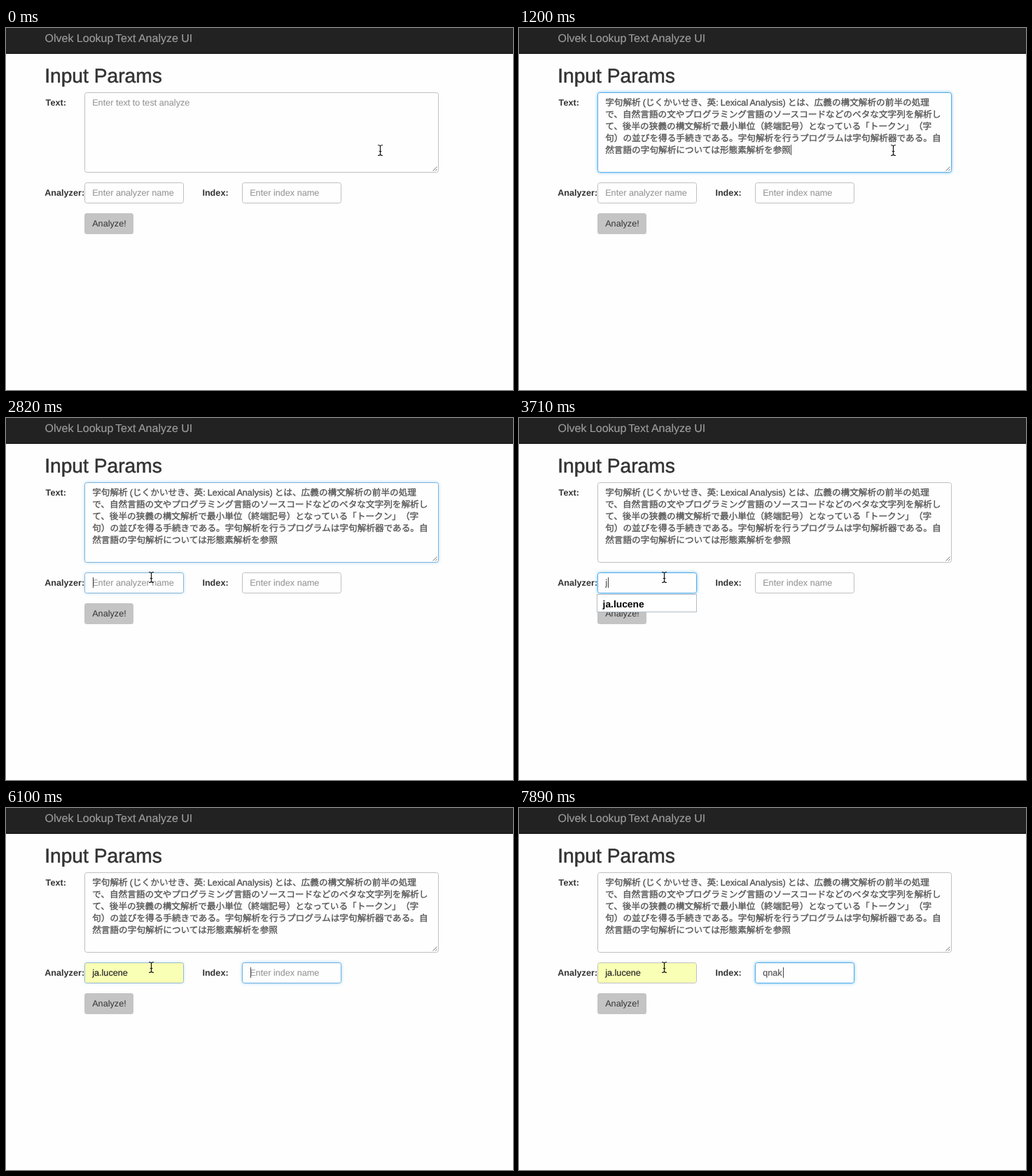
These frames come from a looping animation (724 px wide and 518 px high, 8 s). An HTML page:

```html
<!DOCTYPE html>
<html lang="ja">
<head>
<meta charset="utf-8">
<title>Text analyze form</title>
<style>
  html, body { margin: 0; width: 100%; height: 100%; overflow: hidden; background: #fefefe; }
  svg { display: block; width: 724px; height: 518px; }
  text {
    font-family: "Liberation Sans", "Noto Sans CJK JP", "Noto Sans CJK", sans-serif;
    font-size: 12.65px; fill: #333; white-space: pre;
    text-rendering: geometricPrecision; text-spacing-trim: space-all;
  }
  .brand { font-size: 16px; fill: #9d9d9d; stroke: #9d9d9d; stroke-width: .15px; }
  .title { font-size: 28.2px; stroke: #333; stroke-width: .55px; }
  .label { font-size: 12.65px; font-weight: bold; }
  .hint { fill: #999; stroke: #999; stroke-width: .15px; }
  .value { fill: #555; stroke: #555; stroke-width: .2px; }
  .para { word-spacing: -.5px; stroke-width: .35px; }
  .option { font-size: 13.8px; font-weight: bold; fill: #000; }
</style>
</head>
<body>
<svg id="stage" viewBox="0 0 724 518" xmlns="http://www.w3.org/2000/svg"></svg>
<script>
const LOOP = 8000;
const PAPER = '#fefefe', YELLOW = '#f9ffb5';
const GRAY = [192, 192, 192], BLUE = [82, 172, 234];
const stage = document.getElementById('stage');

function add(tag, attrs, parent = stage) {
  const node = document.createElementNS('http://www.w3.org/2000/svg', tag);
  for (const key in attrs) node.setAttribute(key, attrs[key]);
  parent.appendChild(node);
  return node;
}

function write(x, y, kind, words = '') {
  const node = add('text', { x, y, class: kind });
  node.textContent = words;
  return node;
}

function field(x, y, w, h) {
  return add('rect', { x: x + .5, y: y + .5, width: w - 1, height: h - 1, rx: 3, fill: PAPER });
}

function show(node, on) {
  node.style.display = on ? '' : 'none';
}

// Blend a field's border and glow: 0 = idle, 1 = focused.
function focus(node, k) {
  const rgb = GRAY.map((c, i) => Math.round(c + (BLUE[i] - c) * k));
  node.setAttribute('stroke', `rgb(${rgb})`);
  node.style.filter = k ? `drop-shadow(0 0 2px rgba(102,185,240,${.9 * k}))` : 'none';
}

// Value of the last step that has begun.
function at(t, steps) {
  let value = steps[0][1];
  for (const [time, next] of steps) if (t >= time) value = next;
  return value;
}

// Page
add('rect', { width: 724, height: 518, fill: PAPER });
add('rect', { width: 724, height: 37, fill: '#222' });
add('rect', { y: 36, width: 724, height: 1, fill: '#0c0c0c' });
write(55.5, 20, 'brand', 'Olvek Lookup');
write(156, 20, 'brand', 'Text Analyze UI');
write(55.2, 78, 'title', 'Input Params');
write(56.6, 111, 'label', 'Text:');
write(55.2, 240, 'label', 'Analyzer:');
write(280.4, 240, 'label', 'Index:');

// Fields
const area = field(112, 92, 506, 115);
const analyzer = field(112, 221, 142, 30);
const index = field(337, 221, 142, 30);
add('path', { d: 'M609.5 204.5l6-6m-2.5 6l2.5-2.5', stroke: '#777', fill: 'none' });

add('rect', { x: 112, y: 265, width: 70, height: 30, rx: 3.5, fill: '#c4c4c4' });
write(123.2, 284, '', 'Analyze!');

const areaHint = write(123.2, 111, 'hint', 'Enter text to test analyze');
const areaLines = [
  '字句解析 (じくかいせき、英: Lexical Analysis) とは、広義の構文解析の前半の処理',
  'で、自然言語の文やプログラミング言語のソースコードなどのベタな文字列を解析し',
  'て、後半の狭義の構文解析で最小単位（終端記号）となっている「トークン」（字',
  '句）の並びを得る手続きである。字句解析を行うプログラムは字句解析器である。自',
  '然言語の字句解析については形態素解析を参照'
].map((line, i) => write(123.2, 111 + 17 * i, 'value para', line));

const picked = add('rect', { x: 137, y: 228, width: 37, height: 15, fill: '#abd3f0' });
const analyzerHint = write(123.2, 240, 'hint', 'Enter analyzer name');
const analyzerText = write(123.2, 240, 'value');
const indexHint = write(348.2, 240, 'hint', 'Enter index name');
const indexText = write(348.2, 240, 'value');

// Suggestion list
const list = add('rect', { x: 111.5, y: 252.5, width: 142, height: 25 });
const option = write(119.6, 271, 'option', 'ja.lucene');

const caret = add('rect', { width: 1, height: 15, fill: '#444' });

// Pointers
const beam = add('g', { fill: 'none', stroke: '#111', 'stroke-width': 1.2 });
add('path', {
  d: 'M-3.5-7.5Q-.6-7.5 0-6Q.6-7.5 3.5-7.5M0-6V6M-3.5 7.5Q-.6 7.5 0 6Q.6 7.5 3.5 7.5M-1.8 1.5H1.8'
}, beam);
const arrow = add('g', {});
add('path', {
  d: 'M0 0V12.5L2.9 9.8 5.1 15 7.3 14 5.1 9H9Z',
  fill: '#000', stroke: '#fff', 'stroke-width': 1.6, 'paint-order': 'stroke'
}, arrow);

const areaFocus = [[0, 0], [150, 1], [2680, .6], [2830, .15], [2970, 0]];
const analyzerFocus = [[0, 0], [2680, .5], [2830, .9], [2970, 1], [6100, .35], [6250, 0]];
const indexFocus = [[0, 0], [6100, .75], [6250, 1]];
const analyzerTyped = [[0, ''], [3710, 'j'], [3860, 'ja'], [4160, 'ja.'], [5210, 'ja.lucene']];
const indexTyped = [[0, ''], [6840, 'q'], [6990, 'qn'], [7440, 'qna'], [7890, 'qnak']];
const caretSpot = [
  [0, null], [150, [124, 99]], [600, null], [1200, [388, 167]], [1640, null],
  [2680, [124, 228]], [3420, null], [3710, [127, 228]], [3860, [134, 228]],
  [4160, [137, 228]], [4610, null], [5660, [174, 228]], [6100, [349, 228]],
  [6540, null], [6840, [356, 228]], [6990, [363, 228]], [7440, [370, 228]], [7890, [377, 228]]
];
const pointerSpot = [
  [0, [534.5, 175, beam]], [1490, [494.5, 188, beam]], [1640, [388, 242, arrow]],
  [1790, [305, 272, arrow]], [1930, [224.5, 240, beam]], [2080, [207.5, 228, beam]]
];

function draw(t) {
  focus(area, at(t, areaFocus));
  focus(analyzer, at(t, analyzerFocus));
  focus(index, at(t, indexFocus));

  const pasted = t >= 1200;
  show(areaHint, !pasted);
  areaLines.forEach(line => show(line, pasted));

  const name = at(t, analyzerTyped), filled = t >= 5210;
  analyzerText.textContent = name;
  analyzerText.style.fill = filled ? '#111' : '#555';
  analyzer.setAttribute('fill', filled ? YELLOW : PAPER);
  show(analyzerHint, !name);

  const key = at(t, indexTyped);
  indexText.textContent = key;
  show(indexHint, !key);

  const open = t >= 3710 && t < 5660, chosen = filled && open;
  show(picked, chosen);
  show(list, open);
  show(option, open);
  list.setAttribute('fill', chosen ? '#b2d5fd' : '#fff');
  list.setAttribute('stroke', chosen ? '#a3bddb' : '#b4bcc2');

  const spot = at(t, caretSpot);
  show(caret, spot);
  if (spot) {
    caret.setAttribute('x', spot[0]);
    caret.setAttribute('y', spot[1]);
  }

  const [x, y, shape] = at(t, pointerSpot);
  show(beam, shape === beam);
  show(arrow, shape === arrow);
  shape.setAttribute('transform', `translate(${x} ${y})`);
}

const start = performance.now();
function tick() {
  draw((performance.now() - start) % LOOP);
  requestAnimationFrame(tick);
}
tick();
</script>
</body>
</html>
```
